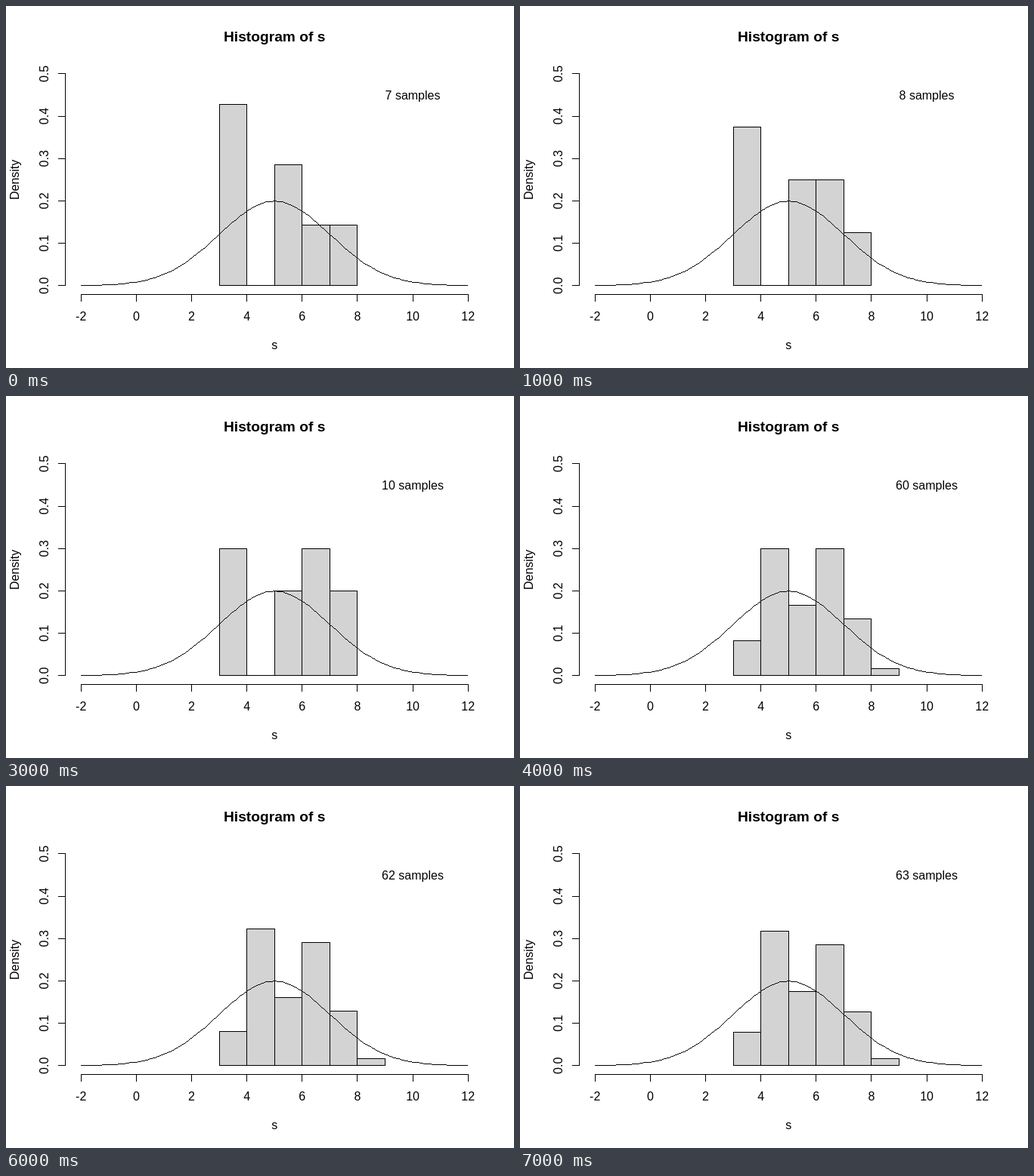
An HTML page that plays this animation: 672 px wide and 480 px high, repeating every 8 s.

```html
<!DOCTYPE html>
<html lang="en">
<head>
<meta charset="utf-8">
<title>Histogram of s</title>
<style>
  html, body { margin: 0; width: 100%; height: 100%; overflow: hidden; background: #fff; }
  svg { display: block; }
  path { stroke: #000; stroke-width: 1; fill: none; shape-rendering: crispEdges; }
  #bars path { fill: #d3d3d3; }
  text { font: 16px "Liberation Sans", Arial, sans-serif; text-anchor: middle; fill: #000; }
  .title { font-size: 19.2px; font-weight: bold; }
</style>
</head>
<body>
<svg width="672" height="480" viewBox="0 0 672 480">
  <g id="bars"></g>
  <g id="plot"></g>
  <text id="count" x="538" y="124"></text>
</svg>
<script>
const STEP = 1000;
// Samples per unit-wide bin, the first bin starting at 3
const STATES = [
  [3, 0, 2, 1, 1],
  [3, 0, 2, 2, 1],
  [3, 0, 2, 2, 2],
  [3, 0, 2, 3, 2],
  [5, 18, 10, 18, 8, 1],
  [5, 19, 10, 18, 8, 1],
  [5, 20, 10, 18, 8, 1],
  [5, 20, 11, 18, 8, 1]
];

const bars = document.getElementById("bars");
const plot = document.getElementById("plot");
const count = document.getElementById("count");

// Data to pixel centres
const px = x => Math.floor(99.2 + (x + 2) * 512 / 14) + 0.5;
const py = y => Math.floor(370.844 - y * 561.78) + 0.5;

function add(parent, tag, attrs, text = "") {
  const el = document.createElementNS("http://www.w3.org/2000/svg", tag);
  for (const key in attrs) el.setAttribute(key, attrs[key]);
  el.textContent = text;
  parent.append(el);
}
const line = d => add(plot, "path", { d });
const label = (x, y, text, cls = "") => add(plot, "text", { x, y, class: cls }, text);
const upright = (x, y, text) =>
  add(plot, "text", { transform: `translate(${x} ${y}) rotate(-90)` }, text);

function drawAxes() {
  line("M99 382.5H612");
  for (let x = -2; x <= 12; x += 2) {
    line(`M${px(x)} 382V392`);
    label(99.2 + (x + 2) * 512 / 14, 417, x);
  }
  line("M78.5 89V371");
  for (let i = 0; i <= 5; i++) {
    line(`M69 ${py(i / 10)}H79`);
    upright(56, 370.8 - i * 56.178, (i / 10).toFixed(1));
  }
  label(355.2, 47, "Histogram of s", "title");
  label(355.2, 455, "s");
  upright(17, 230.4, "Density");
}

// Normal density, mean 5 and sd 2, as 100 straight pieces, one pixel per column
function drawCurve() {
  const pts = Array.from({ length: 101 }, (_, i) => {
    const x = -2 + i * 0.14;
    const density = Math.exp(-((x - 5) ** 2) / 8) / (2 * Math.sqrt(2 * Math.PI));
    return [px(x) - 0.5, py(density) - 0.5];
  });
  let d = "";
  for (let i = 0; i < 100; i++) {
    const [x0, y0] = pts[i], [x1, y1] = pts[i + 1];
    for (let x = x0; x < x1; x++) {
      const y = Math.round(y0 + (y1 - y0) * (x - x0) / (x1 - x0));
      d += `M${x} ${y + 0.5}h1`;
    }
  }
  line(d);
}

function drawBars(bins) {
  const total = bins.reduce((a, b) => a + b, 0);
  bars.replaceChildren();
  bins.forEach((n, i) => {
    const d = `M${px(3 + i)} ${py(0)}V${py(n / total)}H${px(4 + i)}V${py(0)}Z`;
    add(bars, "path", { d });
  });
  count.textContent = `${total} samples`;
}

let shown = -1;
function render(now) {
  const index = Math.floor(now / STEP) % STATES.length;
  if (index !== shown) drawBars(STATES[shown = index]);
}

drawAxes();
drawCurve();
render(0);

let start;
function tick(now) {
  start ??= now;
  render(now - start);
  requestAnimationFrame(tick);
}
requestAnimationFrame(tick);
</script>
</body>
</html>
```
